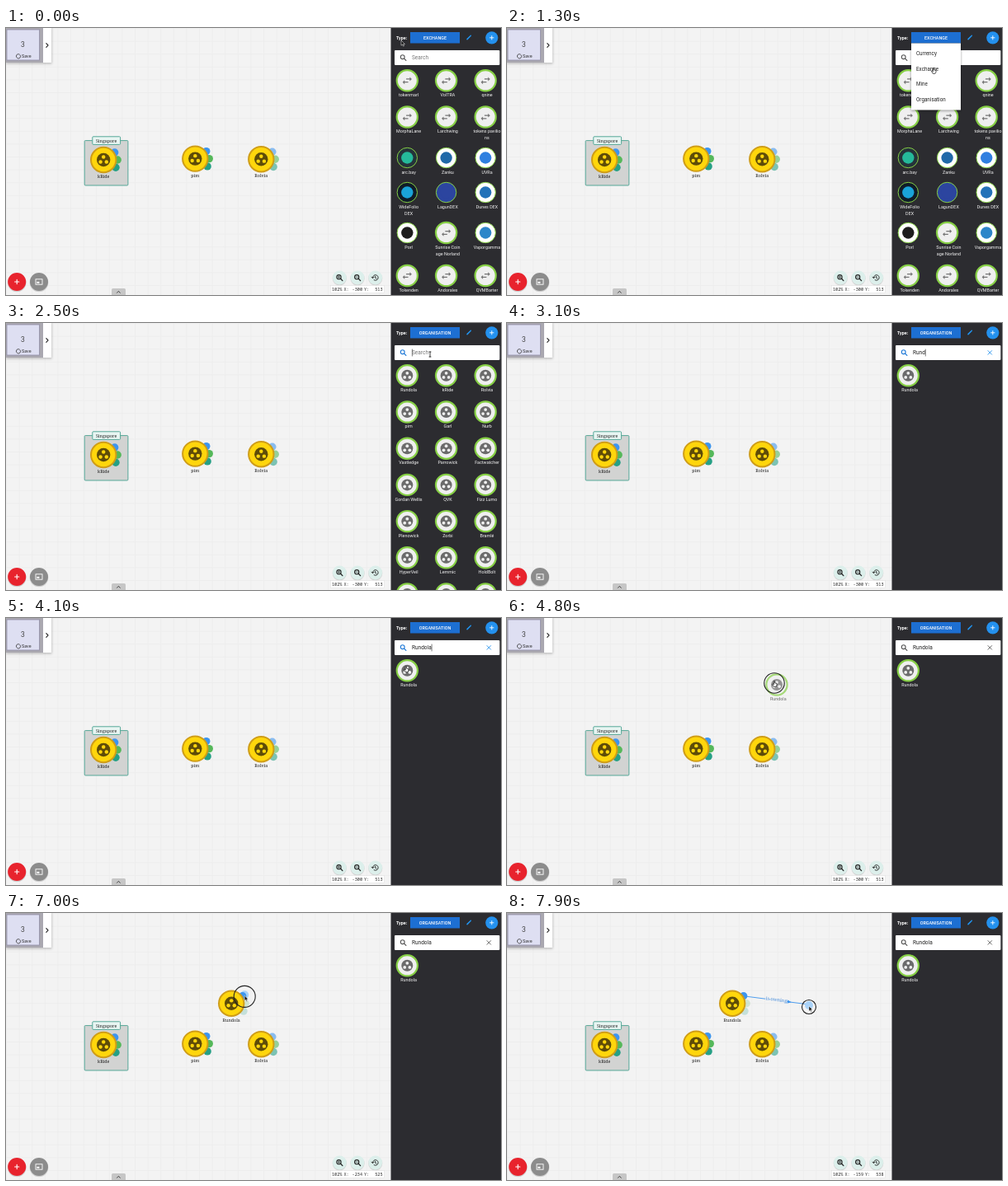
An HTML page for the animation above (8 s loop, 600 px wide and 324 px high).

```html
<!DOCTYPE html>
<html lang="en">
<head>
<meta charset="utf-8">
<title>Network editor</title>
<style>
html, body { margin: 0; width: 100%; height: 100%; overflow: hidden; background: #f3f3f3; }
svg { display: block; width: 600px; height: 324px; font-family: Roboto, sans-serif; }
text { white-space: pre; }
.slab { font-family: "Noto Serif", serif; fill: #222; font-weight: 500; }
.mono { font-family: "Noto Sans Mono", monospace; font-size: 5.2px; font-weight: 500; fill: #222; }
.label { fill: #f4f4f4; font-size: 5.4px; text-anchor: middle; }
.mid { text-anchor: middle; }
.line { fill: none; stroke-linecap: round; stroke-linejoin: round; }
</style>
</head>
<body>
<svg id="stage" viewBox="0 0 600 324"></svg>
<script>
const LOOP = 8000, STEP = 100;
const BLUE = '#3d95ee', GREEN = '#55b85a', TEAL = '#26a085';
const BRAND = 'Rundola';

const text = (x, y, s, size, more = '') => `<text x="${x}" y="${y}" font-size="${size}" ${more}>${s}</text>`;
const circle = (x, y, r, fill, more = '') => `<circle cx="${x}" cy="${y}" r="${r}" fill="${fill}" ${more}/>`;
const rect = (x, y, w, h, fill, more = '') => `<rect x="${x}" y="${y}" width="${w}" height="${h}" fill="${fill}" ${more}/>`;
const line = (d, stroke, width = 1, more = '') => `<path class="line" d="${d}" stroke="${stroke}" stroke-width="${width}" ${more}/>`;
const group = (id, body, more = '') => `<g id="${id}" ${more}>${body}</g>`;
const at = (x, y, body) => `<g transform="translate(${x} ${y})">${body}</g>`;

// Round badge with three holes
const badge = (r, fill, hole) => circle(0, 0, r, fill) +
  [[0, -.42], [-.44, .3], [.44, .3]].map(([x, y]) => circle(x * r, y * r, r * .27, hole)).join('');

const coin = () => circle(0, 0, 15.2, '#ffd60c', 'stroke="#cf9d18" stroke-width="2"') + badge(8.2, '#5e4c08', '#ffd60c');

const ports = (fade, id = '') => [[13.5, -9, BLUE], [17, 0, GREEN], [14.8, 9.3, TEAL]].map(([x, y, c], i) =>
  circle(x, y, 4.7, c, `opacity="${fade}" ${id && `id="${id}${i}"`}`)).join('');

const node = (x, y, name, fade = 1, id = '') => at(x, y, ports(fade, id) + coin() +
  text(0, 22.3, name, 5.3, 'class="slab mid"'));

const ring = (r = 12.6) => circle(0, 0, r, '#efefef', 'stroke="#86cf45" stroke-width="2.2"');
const orgIcon = ring() + badge(7, '#6b6b6b', '#efefef');
const swapIcon = ring() +
  '<path transform="scale(.62) translate(-12 -12)" fill="#757575" d="M7 11L3 15l4 4v-3H14v-2H7zM21 9l-4-4v3H10v2h7v3z"/>';
const logoIcon = (bg, main) => circle(0, 0, 12.2, bg, 'stroke="#86cf45" stroke-width="1"') + circle(0, 0, 7.2, main);

const COLS = [486.3, 533.6, 581.2];
const item = (x, y, icon, name) => at(x, y, icon +
  name.split('|').map((s, i) => `<text class="label" x="1.8" y="${19.2 + i * 8}">${s}</text>`).join(''));

const exchanges = ['tokenmarl', 'VolTRA', 'qnine', 'MorphaLane', 'Larchwing', 'tokens pavilio|ns',
  'arc.bay', 'Zanku', 'UVRa', 'WideFolio|DEX', 'LagunDEX', 'Dunes DEX',
  'Porl', 'Sunrise Coin|age Norland', 'Vaporgamma', 'Tokenden', 'Andoralex', 'QVMBarter'];
const logos = {
  6: ['#25333a', '#25b99a'], 7: ['#fff', '#2069a8'], 8: ['#fff', '#2f7fe0'],
  9: ['#101c28', '#1aa3d8'], 10: ['#2c459f', '#2c459f'], 11: ['#fff', '#2372b9'],
  12: ['#fff', '#1d1d1d'], 14: ['#fff', '#2d86c9']
};
const exchangeRows = [63.8, 108, 157.5, 199.5, 248.5, 300.5];

const orgs = [BRAND, 'kRide', 'Rolvia', 'pim', 'Garl', 'Nurb', 'Vastledge', 'Parrowick', 'Factwatcher',
  'Gordan Wellis', 'QVK', 'Fizz Lumo', 'Plenowick', 'Zorbi', 'Bramlé', 'HyperVeil', 'Lemmic', 'HoldBolt', '', '', ''];

function canvasArea() {
  const lens = sign => circle(-.8, -.8, 2.6, 'none', 'stroke="#222" stroke-width="1.1"') +
    line('M1.3 1.3L3.6 3.6', '#222', 1.3) + line(sign, '#222', .7);
  const tool = (x, icon) => at(x, 303, circle(0, .8, 8.6, '#000', 'opacity=".13"') + circle(0, 0, 8.4, '#dcefeb') + icon);
  const fab = (x, fill, icon) => at(x, 308, circle(0, 1, 11.3, '#000', 'opacity=".15"') + circle(0, 0, 11, fill) + icon);
  return rect(0, 0, 467, 324, '#f3f3f3') + rect(0, 0, 467, 324, 'url(#grid)') +
    rect(0, 0, 55.5, 43.5, '#000', 'opacity=".22" filter="url(#soft)"') +
    rect(0, 0, 45.5, 42, '#aaa8b0') + rect(45, 0, 10, 42, '#fff') +
    rect(1, 2, 39.5, 37, '#dedff2', 'stroke="#8f8da6" stroke-width=".8"') +
    text(20.5, 23, '3', 8.5, 'class="mid" fill="#444"') +
    line('M12.8 35.6A2.6 2.6 0 0 1 16.2 31.9M17.2 33A2.6 2.6 0 0 1 13.8 36.7', '#333', .8) +
    text(19, 36.4, 'Save', 5.4, 'fill="#333"') +
    line('M48.8 18.7L51 21L48.8 23.3', '#222', 1.1) +
    rect(95.2, 136.6, 52.7, 54.4, '#d2d3d2', 'stroke="#55a797" rx="1"') +
    rect(104.8, 131.8, 33.8, 9.6, '#e8f5f2', 'stroke="#55a797" rx="1"') +
    text(121.7, 138.6, 'Singapore', 5.3, 'class="slab mid"') +
    node(118.2, 160, 'kRide') + node(229.3, 158.6, 'pim') + node(309.3, 159.2, 'Rolvia', .58) +
    fab(13.2, '#e8232d', line('M-2.6 0H2.6M0-2.6V2.6', '#fff', 1.1)) +
    fab(40, '#8c8c8c', rect(-4, -3.2, 8, 6.4, 'none', 'stroke="#fff" stroke-width=".9"') + rect(-2.6, -.2, 3, 2, '#fff')) +
    rect(128, 316, 17, 9, '#c6c6c6', 'rx="1.5"') + line('M134.5 321.3L136.4 319.4L138.3 321.3', '#333', .9) +
    tool(404.3, lens('M-2-.8H.4M-.8-2V.4')) + tool(426, lens('M-2-.8H.4')) +
    tool(447.7, line('M-3.2 0A3.3 3.3 0 1 1-1.6 2.8M-4.6-.8L-3.2.8L-1.7-.8M0-1.6V.3L1.3 1', '#222', .9)) +
    rect(393.3, 312.5, 65, 9, '#fff', 'stroke="#ddd" stroke-width=".5"') +
    [[395, '102%'], [409.5, 'X:'], [434, 'Y:']].map(([x, s]) => `<text class="mono" x="${x}" y="319">${s}</text>`).join('') +
    '<text class="mono" id="posX" x="432" y="319" text-anchor="end"></text>' +
    '<text class="mono" id="posY" x="456.6" y="319" text-anchor="end"></text>';
}

function sidebar() {
  const exchangeGrid = exchanges.map((s, i) =>
    item(COLS[i % 3], exchangeRows[i / 3 | 0], logos[i] ? logoIcon(...logos[i]) : swapIcon, s)).join('');
  const orgGrid = orgs.map((s, i) => item(COLS[i % 3], 63.8 + 44.2 * (i / 3 | 0), orgIcon, s)).join('');
  const options = ['Currency', 'Exchange', 'Mine', 'Organisation'].map((s, i) =>
    text(496, 33 + 18.6 * i, s, 6.3, 'fill="#222"')).join('');
  return rect(466.5, 0, 134, 324, '#2c2c30') +
    text(473, 13.9, 'Type:', 5.4, 'fill="#fff" font-weight="700"') +
    rect(490, 5, 60, 13.5, '#1d6fd2') +
    text(520, 13.8, '', 5.4, 'id="kind" class="mid" fill="#fff" font-weight="500"') +
    line('M559 13.6L562.4 10.2', '#2196f3', 1.5) + line('M563.1 9.5L563.3 9.3', '#2196f3', 1.5) +
    circle(588.8, 11.8, 7.6, '#2491ee') + line('M586.6 11.8H591M588.8 9.6V14', '#fff', .9) +
    rect(471, 27, 127.4, 18, '#fff', 'rx="1"') +
    group('lens', circle(480.7, 35.2, 2.4, 'none') + line('M482.6 37.1L484.9 39.4', 'currentColor', 1.2), 'stroke="currentColor" stroke-width="1.1"') +
    text(492, 38.4, '', 6.5, 'id="query"') +
    group('caret', line('M0 32V40', '#222', .6)) +
    group('clear', line('M583 33.6L587.6 38.2M587.6 33.6L583 38.2', 'currentColor', .9)) +
    group('exchangeGrid', exchangeGrid) + group('orgGrid', orgGrid) +
    group('found', item(COLS[0], 63.8, orgIcon, BRAND)) +
    group('menu', rect(490, 19.5, 60, 81, '#000', 'opacity=".4" filter="url(#soft)"') + rect(490, 18.5, 60, 81, '#fff') + options);
}

function overlays() {
  const tag = (y, fill, body) => at(260.4, y, circle(0, 0, 4.7, fill) + body);
  return group('link', line('', BLUE, .9, 'id="wire"') + circle(0, 0, 5, '#a9d2f8', 'id="tip"') +
      group('wireLabel', `<path d="M13-2.3L18.5 0L13 2.3z" fill="${BLUE}"/>` +
        text(0, 1, 'is owning', 5.6, 'class="slab mid" style="fill:#3d86d8" stroke="#f3f3f3" stroke-width="1.4" paint-order="stroke"'))) +
    group('fresh', node(273.2, 109.8, BRAND, 1, 'port') +
      group('actions', tag(97, '#e0263c', rect(-1.5, -1.2, 3, 3.4, '#fff') + line('M-2-2.2H2', '#fff', .8)) +
        tag(121, '#1d69c4', text(0, 2.1, 'i', 6, 'class="mid" fill="#fff" font-weight="700"')))) +
    group('ghost', orgIcon + text(1.8, 19.2, BRAND, 5.4, 'class="mid" fill="#333"'), 'opacity=".7"') +
    group('pointer', circle(0, 0, 8, 'none', 'id="press" stroke="#222" stroke-width="1.1"') +
      '<path id="arrow" d="M0-1V5.2L1.5 3.9L2.5 6.1L3.5 5.6L2.5 3.5H4.4z" fill="#111" stroke="#fff" stroke-width=".5"/>' +
      '<path id="hand" d="M-.6-2.6Q0-3.3.6-2.6V-.2L3 .4V2.6L2 4.3H-.8L-2.6 1.2L-1.9.8L-.6 1.9z" fill="#fff" stroke="#111" stroke-width=".7"/>' +
      line('M-1-3H1M0-3V3M-1 3H1', '#111', .8, 'id="beam"'));
}

document.getElementById('stage').innerHTML = `<defs>
  <pattern id="grid" width="15.6" height="15.6" patternUnits="userSpaceOnUse">
    <path d="M0 .5H15.6M.5 0V15.6" stroke="#ebebeb" stroke-width=".8"/></pattern>
  <filter id="soft"><feGaussianBlur stdDeviation="1.6"/></filter></defs>` +
  canvasArea() + sidebar() + overlays();

const ui = {};
document.querySelectorAll('[id]').forEach(el => ui[el.id] = el);
const show = (name, on) => ui[name].style.display = on ? '' : 'none';
const move = (name, x, y, turn = 0) => ui[name].setAttribute('transform', `translate(${x} ${y}) rotate(${turn})`);

// Pointer stops: time, x, y
const path = [[0, 479, 16], [150, 479, 16], [800, 520, 13], [1000, 520, 13], [1300, 517, 51], [1650, 515, 87],
  [1850, 515, 87], [2300, 514, 38], [3650, 514, 38], [4150, 484, 62], [4450, 484, 62], [4800, 324, 79],
  [5350, 270, 108], [6300, 270, 108], [6700, 287, 101], [6900, 287, 101], [7900, 366, 114], [LOOP, 366, 114]];

function pointerAt(t) {
  const i = path.findIndex(p => p[0] > t);
  const [t0, x0, y0] = path[i - 1], [t1, x1, y1] = path[i];
  const k = (t - t0) / (t1 - t0), e = k * k * (3 - 2 * k);
  return [x0 + (x1 - x0) * e, y0 + (y1 - y0) * e];
}

function draw(t) {
  const within = (a, b) => t >= a && t < b;
  const [x, y] = pointerAt(t);

  // Type menu and lists
  ui.kind.textContent = t < 1800 ? 'EXCHANGE' : 'ORGANISATION';
  show('menu', within(1000, 1800));
  show('exchangeGrid', t < 1900);
  show('orgGrid', within(1900, 2700));
  show('found', t >= 2700);

  // Search field
  const typed = t < 2600 ? 0 : Math.min(BRAND.length, 1 + Math.floor((t - 2600) / 160));
  const focused = within(2400, 4300);
  ui.query.textContent = typed ? BRAND.slice(0, typed) : 'Search';
  ui.query.setAttribute('fill', typed ? '#222' : '#777');
  ui.lens.style.color = focused ? '#1d78d6' : '#555';
  ui.clear.style.color = focused ? '#2491ee' : '#555';
  show('clear', typed);
  show('caret', focused && (typed < BRAND.length || t % 1000 < 500));
  move('caret', 492.4 + (typed ? ui.query.getComputedTextLength() : 0), 0);

  // New node and its link
  show('ghost', within(4450, 5500));
  move('ghost', x + 3, y + 2);
  show('fresh', t >= 5500);
  show('actions', t < 6700);
  const linking = t >= 6900;
  for (const i of [1, 2]) ui['port' + i].setAttribute('opacity', linking ? .22 : 1);
  show('link', linking);
  const ax = 287, ay = 100.8, bx = x, by = y - 3;
  ui.wire.setAttribute('d', `M${ax} ${ay}L${bx} ${by}`);
  move('tip', bx, by + 1);
  move('wireLabel', (ax + bx) / 2, (ay + by) / 2, Math.atan2(by - ay, bx - ax) * 180 / Math.PI);
  show('wireLabel', bx - ax > 15);
  ui.posX.textContent = linking ? Math.round(x / 1.02 - 518) : -300;
  ui.posY.textContent = linking ? Math.round(y / 1.02 + 426) : 513;

  // Pointer
  const mode = t < 700 ? 'arrow' : t < 2100 ? 'hand' : t < 2600 ? 'beam' : t < 3700 ? '' :
    t < 4000 ? 'arrow' : t < 6900 ? 'hand' : 'arrow';
  for (const m of ['arrow', 'hand', 'beam']) show(m, m === mode);
  const pressed = within(4450, 5500) ? 4450 : linking ? 6800 : 0;
  show('press', pressed);
  ui.press.setAttribute('r', Math.max(8.2, 14 - (t - pressed) / 200));
  move('pointer', x, y);
}

const start = performance.now();
function tick() {
  const t = (performance.now() - start) % LOOP;
  draw(Math.floor(t / STEP) * STEP);
  requestAnimationFrame(tick);
}
tick();
</script>
</body>
</html>
```
